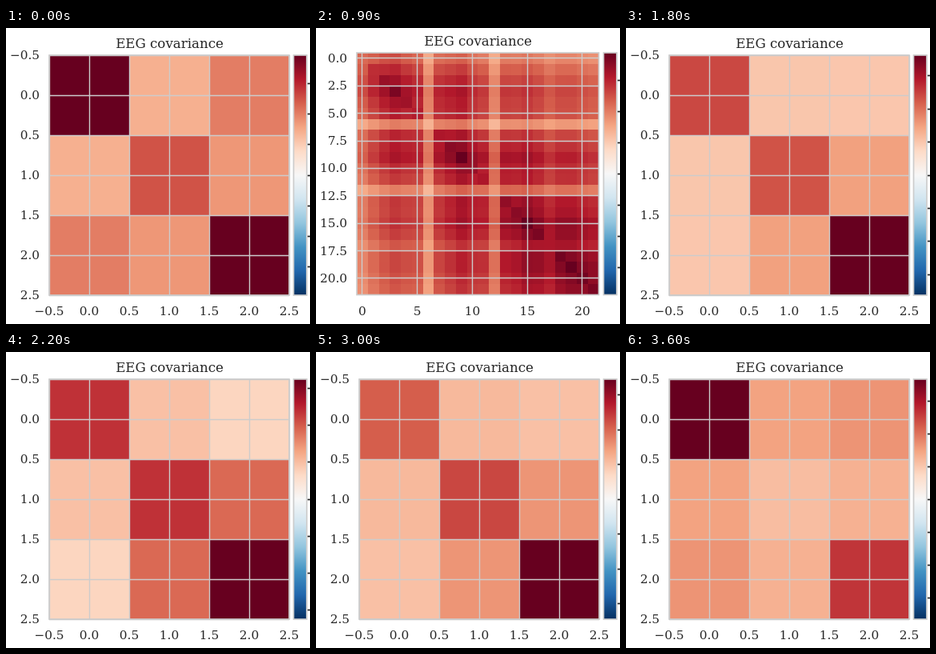
Animation of 380 by 370 pixels, one loop 3.7 s. Source, as an HTML page with a canvas:

```html
<!DOCTYPE html>
<html>
<head>
<meta charset="utf-8">
<title>EEG covariance</title>
<style>
html, body { margin: 0; width: 100%; height: 100%; overflow: hidden; background: #fff; }
canvas { display: block; }
</style>
</head>
<body>
<canvas id="stage" width="380" height="370"></canvas>
<script>
const ctx = document.getElementById('stage').getContext('2d');
const STEPS = 37, STEP_MS = 100;
const INK = '#262626', GRID = '#cccccc';
const FONT = '"DejaVu Serif", "Noto Serif", serif';

// Diverging map from blue (-1) through white (0) to red (+1)
const STOPS = ['053061', '2166ac', '4393c3', '92c5de', 'd1e5f0', 'f7f7f7',
  'fddbc7', 'f4a582', 'd6604d', 'b2182b', '67001f'];
const RGB = STOPS.map(h => [0, 2, 4].map(i => parseInt(h.slice(i, i + 2), 16)));

// Small matrix: upper triangle by rows, then spacing of the bar ticks
const SMALL = [
  { at: 0, v: [1, .36, .515, .635, .44, 1, 38.3] },
  { at: 14, v: [.605, .256, .333, .54, .25, 1, 36.6] },
  { at: 22, v: [.73, .3, .22, .73, .575, 1, 46.3] },
  { at: 30, v: [.605, .325, .3, .67, .445, 1, 43.5] },
  { at: 36, v: [1, .405, .45, .31, .355, .72, 41] }
];

// Large matrix: channel strengths, then decay with distance and tick spacing
const LARGE = [
  { at: 3, v: [.94, .85, .91, .96, .98, .95, .5, .8, .85, .88, .86, .78, .52,
    .68, .74, .79, .77, .72, .76, .76, .77, .8, .027, 59.5] },
  { at: 9, v: [.74, .84, .91, .95, .9, .87, .58, .88, .93, .98, .91, .88, .65,
    .92, .93, .98, .95, .88, .96, .98, .96, .95, .02, 39] }
];

const lerp = (a, b, p) => a + (b - a) * p;

function color(value) {
  const x = Math.max(0, Math.min(1, .5 + value / 2)) * 10;
  const i = Math.min(9, Math.floor(x));
  return `rgb(${RGB[i].map((c, n) => Math.round(lerp(c, RGB[i + 1][n], x - i)))})`;
}

// Values at a step, blended between neighbouring keys around the loop
function blend(keys, step) {
  const n = keys.length;
  const i = (keys.filter(k => k.at <= step).length - 1 + n) % n;
  const a = keys[i], b = keys[(i + 1) % n];
  const gap = to => (to - a.at + STEPS) % STEPS;
  const p = gap(step) / gap(b.at);
  return a.v.map((v, j) => lerp(v, b.v[j], p));
}

function text(str, x, y, size, align) {
  ctx.font = `${size}px ${FONT}`;
  ctx.textAlign = align;
  ctx.fillStyle = INK;
  ctx.fillText(str, x, y);
}

function line(x1, y1, x2, y2) {
  ctx.beginPath();
  ctx.moveTo(x1, y1);
  ctx.lineTo(x2, y2);
  ctx.stroke();
}

const label = (n, digits) => n.toFixed(digits).replace('-', '\u2212');
const snap = n => Math.floor(n) + .5;

function colorBar(top, bottom, spacing) {
  const fill = ctx.createLinearGradient(0, bottom, 0, top);
  STOPS.forEach((c, i) => fill.addColorStop(i / 10, '#' + c));
  ctx.fillStyle = fill;
  ctx.fillRect(360, top, 15.5, bottom - top);
  ctx.strokeStyle = GRID;
  ctx.lineWidth = 1.7;
  ctx.strokeRect(359.5, top, 16.5, bottom - top);
  ctx.strokeStyle = INK;
  const mid = (top + bottom) / 2, reach = (bottom - top) / 2;
  for (let i = -Math.floor(reach / spacing); i * spacing <= reach; i++) {
    const y = snap(mid + i * spacing);
    line(377, y, 380, y);
  }
}

function plot({ count, x, y, size, cell, xTicks, yTicks, xDigits, labelX, titleX, titleY, spacing }) {
  const unit = size / count;
  const edge = i => Math.round(i * unit);
  ctx.fillStyle = '#fff';
  ctx.fillRect(0, 0, 380, 370);
  for (let r = 0; r < count; r++) {
    for (let c = 0; c < count; c++) {
      ctx.fillStyle = color(cell(r, c));
      ctx.fillRect(x + edge(c), y + edge(r), edge(c + 1) - edge(c), edge(r + 1) - edge(r));
    }
  }
  ctx.strokeStyle = GRID;
  ctx.lineWidth = 1.4;
  for (const t of xTicks) {
    const px = x + (t + .5) * unit;
    line(snap(px), y, snap(px), y + size);
    text(label(t, xDigits), px, 359, 15.28, 'center');
  }
  for (const t of yTicks) {
    const py = y + (t + .5) * unit;
    line(x, snap(py), x + size, snap(py));
    text(label(t, 1), labelX, py + 5, 15.28, 'right');
  }
  ctx.lineWidth = 1.7;
  ctx.strokeRect(x, y, size, size);
  text('EEG covariance', titleX, titleY, 16.67, 'center');
  colorBar(y, y + size, spacing);
}

const ticks = (from, by, n) => Array.from({ length: n }, (_, i) => from + i * by);

function drawSmall(step) {
  const [a, b, c, d, e, f, spacing] = blend(SMALL, step);
  const m = [[a, b, c], [b, d, e], [c, e, f]];
  const halves = ticks(-.5, .5, 7);
  plot({
    count: 3, x: 54, y: 34, size: 300, cell: (r, col) => m[r][col],
    xTicks: halves, yTicks: halves, xDigits: 1,
    labelX: 42, titleX: 204.5, titleY: 25, spacing
  });
}

function drawLarge(step) {
  const v = blend(LARGE, step);
  const decay = v[22];
  const cell = (r, c) =>
    Math.max(.3, v[r] * v[c] * Math.exp(-decay * Math.abs(r - c)) * (r === c ? 1.05 : 1));
  plot({
    count: 22, x: 51, y: 31, size: 302.5, cell,
    xTicks: ticks(0, 5, 5), yTicks: ticks(0, 2.5, 9), xDigits: 0,
    labelX: 39, titleX: 202.5, titleY: 22, spacing: v[23]
  });
}

// The two plots alternate on every step
function frame() {
  const step = Math.floor(performance.now() / STEP_MS) % STEPS;
  (step % 2 ? drawLarge : drawSmall)(step);
  requestAnimationFrame(frame);
}
frame();
</script>
</body>
</html>
```
